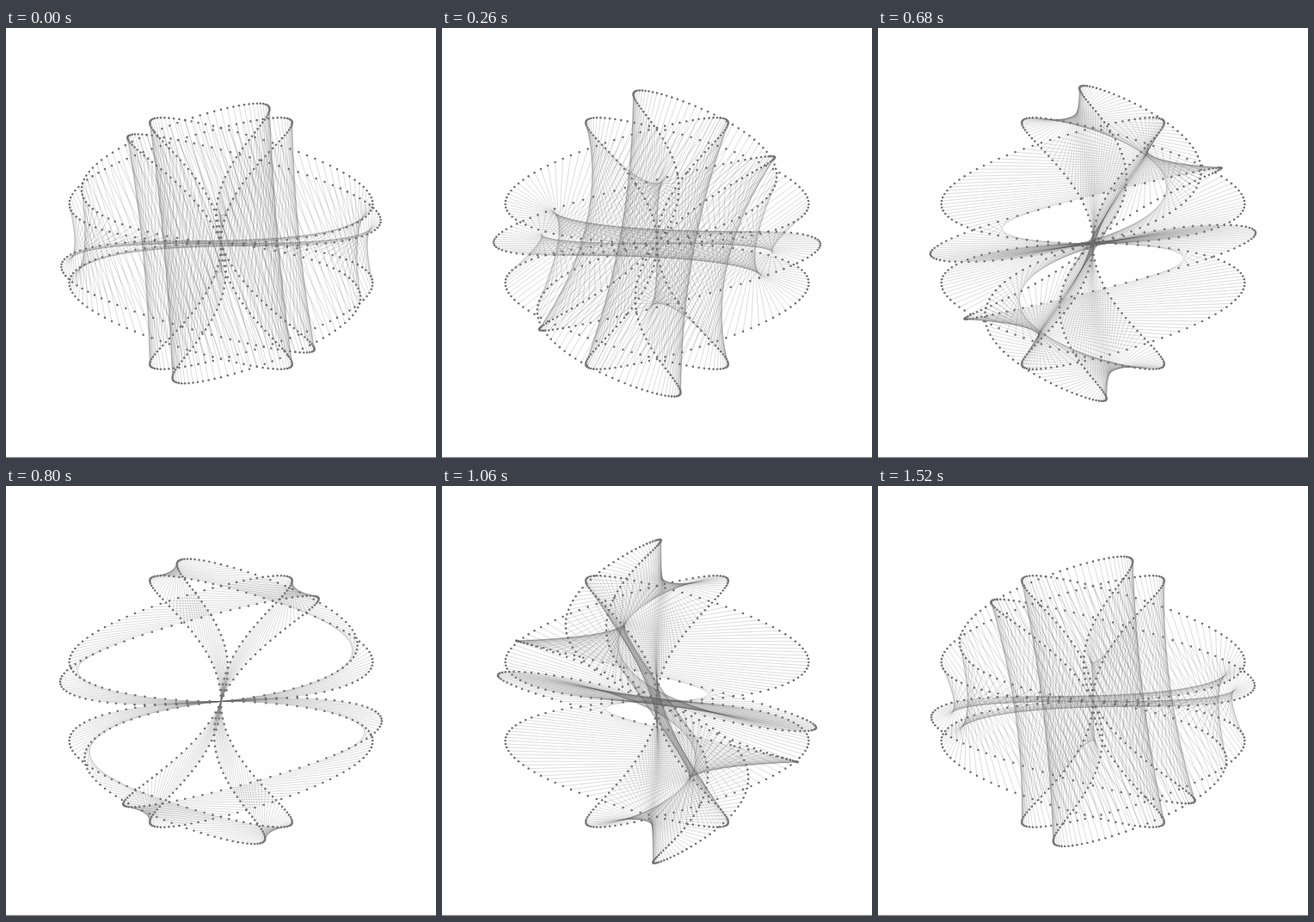
Animation of 500x500 px, one loop 1.6 s. Source, as an HTML page with a canvas:

```html
<!DOCTYPE html>
<html lang="en">
<head>
<meta charset="utf-8">
<title>Linked curves</title>
<style>
  html, body { margin: 0; width: 100%; height: 100%; overflow: hidden; background: #fff; }
  canvas { display: block; width: 500px; height: 500px; }
</style>
</head>
<body>
<canvas id="stage" width="500" height="500"></canvas>
<script>
const ctx = document.getElementById('stage').getContext('2d');
const LOOP = 1600, COUNT = 360, RADIUS = 190, CX = 250, CY = 250.5;
const DEGREE = Math.PI / 180, FIRST_PHASE = 80, PHASE_STEP = 8;

// Tempo: [ms, steps taken], steady between neighbours.
const TEMPO = [[0, 0], [20, 1], [340, 5], [540, 7], [740, 10],
  [900, 15], [1060, 17], [1360, 20], [LOOP, 23]];

function phaseAt(ms) {
  const next = TEMPO.findIndex(([t]) => t > ms);
  const [t0, n0] = TEMPO[next - 1], [t1, n1] = TEMPO[next];
  const step = Math.floor(n0 + (ms - t0) * (n1 - n0) / (t1 - t0));
  return (FIRST_PHASE + PHASE_STEP * step) * DEGREE;
}

function point(u, phase) {
  const w = u + phase;
  return [
    CX + RADIUS * Math.cos(u) * Math.sin(4 * w),
    CY - RADIUS * Math.sin(u) * Math.sin(2 * w)
  ];
}

function line(from, to) {
  ctx.beginPath();
  ctx.moveTo(...from);
  ctx.lineTo(...to);
  ctx.stroke();
}

function dot([x, y]) {
  ctx.beginPath();
  ctx.arc(x, y, 1.3, 0, 2 * Math.PI);
  ctx.fill();
}

function bar(y, color) {
  ctx.fillStyle = color;
  ctx.fillRect(0, y, 500, 1);
}

function draw(ms) {
  const phase = phaseAt(ms);
  const pairs = Array.from({ length: COUNT }, (_, i) =>
    [point(i * DEGREE, 0), point(i * DEGREE, phase)]);

  ctx.fillStyle = '#fff';
  ctx.fillRect(0, 0, 500, 500);

  // Separate strokes let crossing lines build up tone.
  ctx.strokeStyle = 'rgba(95, 95, 95, 0.24)';
  ctx.lineWidth = 0.9;
  pairs.forEach(([from, to]) => line(from, to));

  ctx.fillStyle = '#747474';
  pairs.flat().forEach(dot);

  bar(498, '#f0f0f0');
  bar(499, '#808080');
}

const start = performance.now();
function tick() {
  draw((performance.now() - start) % LOOP);
  requestAnimationFrame(tick);
}
tick();
</script>
</body>
</html>
```
